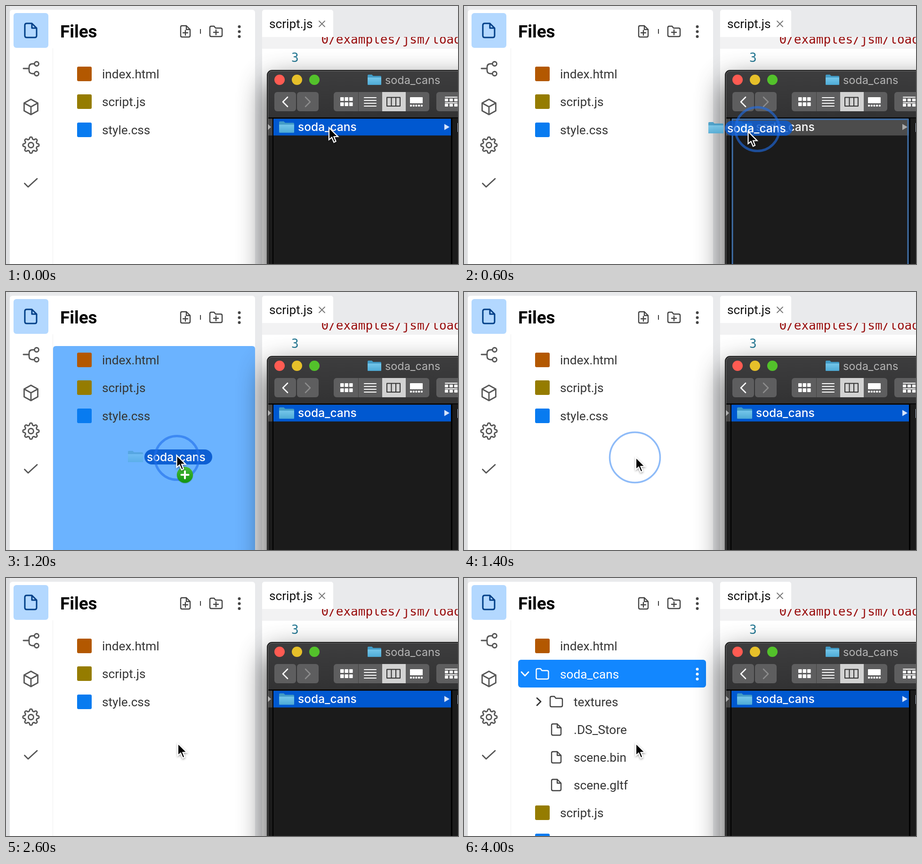
An HTML page that plays this animation: 960 px wide and 549 px high, repeating every 4200 ms.

```html
<!DOCTYPE html>
<html lang="en">
<head>
<meta charset="utf-8">
<title>Drag a folder into the file list</title>
<style>
html, body { margin: 0; width: 100%; height: 100%; overflow: hidden; background: #e9eaec; }
svg { display: block; width: 960px; height: 549px; }
text { font: 26.2px Roboto, sans-serif; fill: #363636; white-space: pre; }
.finder text { font: 500 24.5px Inter, sans-serif; fill: #fff; }
.line { fill: none; stroke: #555; stroke-width: 2.8; stroke-linecap: round; stroke-linejoin: round; }
</style>
</head>
<body>
<svg id="stage" viewBox="0 0 960 549"></svg>
<script>
const STEP = 200, LOOP = 4200;
const MONO = "font-family:'DejaVu Sans Mono',monospace;font-size:26px;";
const rect = (x, y, w, h, fill, r = 0, more = '') =>
  `<rect x="${x}" y="${y}" width="${w}" height="${h}" rx="${r}" fill="${fill}" ${more}/>`;
const dot = (x, y, r, fill) => `<circle cx="${x}" cy="${y}" r="${r}" fill="${fill}"/>`;
const text = (x, y, s, style = '') => `<text x="${x}" y="${y}" style="${style}">${s}</text>`;
const line = (d, color = '#555', w = 2.8) =>
  `<path class="line" d="${d}" style="stroke:${color};stroke-width:${w}"/>`;
const group = (id, body, more = '') => `<g id="${id}" ${more}>${body}</g>`;
const at = (x, y, body) => `<g transform="translate(${x} ${y})">${body}</g>`;
const dots = (x, y, fill) => [-10.5, 0, 10.5].map(d => dot(x, y + d, 3, fill)).join('');

// Outline icons centred on (x, y)
const page = (x, y, color = '#444') => at(x, y,
  line('M2-12H-7Q-10-12-10-9V9Q-10 12-7 12H7Q10 12 10 9V-4ZM2-12V-4H10', color, 2.4));
const folder = (x, y, color = '#444') => at(x, y,
  line('M-13-8Q-13-11-10-11H-4L-1-7H10Q13-7 13-4V8Q13 11 10 11H-10Q-13 11-13 8Z', color, 2.4));
const blueFolder = (x, y, w = 32) => at(x, y,
  `<g transform="scale(${w / 32})">` +
  `<path d="M0 2Q0 0 2 0H10L13 3H30Q32 3 32 5V24H0Z" fill="#429bc6"/>` +
  `<path d="M0 7H32V22Q32 24 30 24H2Q0 24 0 22Z" fill="url(#sky)"/></g>`);

const fileRow = (y, name, color) =>
  rect(151, y - 16, 31, 31, color, 3) + text(204, y + 9, name);

function gear(x, y) {
  let d = '';
  for (let i = 0; i < 96; i++) {
    const a = i / 96 * Math.PI * 2;
    const r = 15 + 2.2 * Math.tanh(2 * Math.cos(8 * a));
    d += (i ? 'L' : 'M') + (x + r * Math.sin(a)).toFixed(1) + ' ' + (y - r * Math.cos(a)).toFixed(1);
  }
  return line(d + 'Z') + `<circle class="line" cx="${x}" cy="${y}" r="5.5"/>`;
}

const sidebar =
  rect(0, 0, 8, 549, '#dedfe1') +
  rect(8, 8, 521, 560, '#fff', 6) +
  rect(99, 90, 1, 460, '#efefef') +
  rect(16, 15, 74, 74, '#b3d8ff', 6) +
  line('M55 37H44Q40 37 40 41V63Q40 67 44 67H61Q65 67 65 63V47ZM55 37V47H65', '#003f87', 3) +
  line('M37 133H49M60 123H57Q49 123 49 130V137Q49 144 57 144H60') +
  '<circle class="line" cx="65" cy="123" r="4.5"/><circle class="line" cx="65" cy="144" r="4.5"/>' +
  line('M53 198.500L67.500 206.500V223L53 231L38.500 223V206.500ZM38.500 206.500L53 214.500L67.500 206.500M53 214.500V231') +
  gear(53, 296) +
  line('M39.500 377.500L47 385L66 367.500');

const header =
  text(115, 67, 'Files', 'font-size:36.8px;font-weight:700;fill:#000') +
  page(381, 54) + line('M376 57H386M381 52V62', '#444', 2.4) +
  rect(412, 49, 2, 10, '#444') +
  folder(446, 54) + line('M441 56H451M446 51V61', '#444', 2.4) +
  dots(495.5, 54.5, '#444');

const html = fileRow(145, 'index.html', '#b35800');
const before = fileRow(204, 'script.js', '#957c00') + fileRow(264, 'style.css', '#087bf0');
const after =
  rect(115, 174, 399, 59, '#1287ff', 6) +
  line('M122 200L129.500 208L137 200', '#fff') + folder(166.500, 204, '#fff') +
  text(204, 213.500, 'soda_cans', 'fill:#fff') + dots(495.5, 204.5, '#fff') +
  line('M155 255.500L163 263L155 271', '#333') + folder(196, 263) + text(233, 273, 'textures') +
  ['.DS_Store', 'scene.bin', 'scene.gltf'].map((s, i) =>
    page(196, 322.5 + 59 * i) + text(233, 332 + 59.2 * i, s)).join('') +
  fileRow(500, 'script.js', '#957c00') + fileRow(560, 'style.css', '#087bf0');

const editor =
  rect(544, 66, 416, 483, '#fff') + rect(544, 66, 416, 25, '#f2f2f3') +
  `<g clip-path="url(#code)">${text(669.5, 80, '0/examples/jsm/load', MONO + 'fill:#980b0b')}</g>` +
  text(606, 119, '3', MONO + 'fill:#237893');
const tab =
  rect(544, 8, 151, 58, '#fff', 5) + rect(544, 50, 151, 16, '#fff') +
  text(559, 47, 'script.js', 'fill:#111') + line('M665 32L677 44M677 32L665 44', '#777', 1.8);

function cells(x, y, cols, rows, w, h, dx, dy, fill = '#fff') {
  let s = '';
  for (let i = 0; i < cols * rows; i++)
    s += rect(x + i % cols * dx, y + Math.floor(i / cols) * dy, w, h, fill, 1);
  return s;
}
const toolbar =
  dot(581, 157, 11, '#ff5b52') + dot(618, 157, 11, '#e6c02a') + dot(655, 157, 11, '#53c22b') +
  blueFolder(768, 146, 29) + text(805, 166, 'soda_cans', 'font-size:23.4px;font-weight:400;fill:#b5b5b5') +
  rect(570, 183, 46, 41, '#5e5e5f', 6) + rect(618, 183, 46, 41, '#5e5e5f', 6) +
  line('M598 194L588 204L598 214', '#fff', 2.6) + line('M636 194L646 204L636 214', '#8c8c8c', 2.6) +
  rect(696, 183, 203, 41, '#5e5e5f', 6) + rect(748, 183, 1, 41, '#444') +
  rect(799, 183, 50, 41, '#d2d2d2') +
  cells(710, 194, 3, 2, 7.5, 8, 9.5, 11) + cells(760, 194, 1, 4, 27, 2, 0, 6) +
  line('M809 194.500H837V213H809ZM818.500 194.500V213M828 194.500V213', '#333', 2) +
  rect(858, 194, 27, 13, '#fff', 1) + cells(858, 210, 5, 1, 4, 4, 5.7, 0) +
  rect(914, 183, 90, 41, '#5e5e5f', 6) +
  cells(932, 193, 1, 2, 27, 2, 0, 12) + cells(932, 197, 3, 2, 7, 6, 10, 11);

const finder =
  rect(555, 137, 900, 900, '#353536', 10, 'stroke="#1c1c1c" stroke-width="2"') +
  rect(556.5, 138.5, 900, 900, 'url(#steel)', 9, 'stroke="#6a6a6a" stroke-width="1"') + toolbar +
  rect(557, 238, 410, 320, '#1b1b1b') + rect(557, 237, 410, 2, '#050505') +
  rect(557, 240, 10, 35.5, '#464646') + '<path d="M556 251L563 257.500L556 264Z" fill="#aaa"/>' +
  rect(566, 238, 2, 311, '#000') + rect(945, 238, 3, 311, '#000') +
  rect(959, 249, 1, 19, '#aab7c8') +
  `<rect id="row" x="568" y="240" width="377" height="35.5"/>` +
  blueFolder(580, 245.5) + text(620, 266, 'soda_cans') +
  '<path id="arrow" d="M931 251L942 257.500L931 264Z"/>' +
  group('frame', line('M570 560V241H943V560', '#3f6fa8', 3));

const ghost =
  `<g id="ghostIcon">${blueFolder(-40, -13)}</g>` +
  rect(-5, -16, 144, 32, '#0b5cd2', 16, 'id="pill"') + text(0, 9, 'soda_cans');

const badge = dot(17.5, 42.5, 17.5, '#16701a55') + dot(17.5, 41.5, 17, 'url(#green)') +
  line('M10 41.500H25M17.500 34V49', '#fff', 4);
const pointer = '<path d="M0 0V25.500L6 20.500L10.500 31L14.500 29L10.500 19H19Z" fill="#000" ' +
  'stroke="#fff" stroke-width="2.2" filter="url(#soft)"/>';

const fade = (id, top, bottom) =>
  `<linearGradient id="${id}" x2="0" y2="1"><stop stop-color="${top}"/><stop offset="1" stop-color="${bottom}"/></linearGradient>`;

stage.innerHTML =
  `<defs>${fade('sky', '#74c6ea', '#4eabd6')}${fade('green', '#49bd3a', '#129410')}
  <linearGradient id="steel" gradientUnits="userSpaceOnUse" x1="0" y1="138" x2="0" y2="238">
    <stop stop-color="#3d3d3e"/><stop offset="1" stop-color="#323233"/></linearGradient>
  <clipPath id="code"><rect x="544" y="66" width="416" height="40"/></clipPath>
  <filter id="blur" x="-30%" y="-30%" width="160%" height="160%"><feGaussianBlur stdDeviation="31"/></filter>
  <filter id="soft" x="-50%" y="-50%" width="200%" height="200%">
    <feDropShadow dx="0" dy="2" stdDeviation="2" flood-opacity=".4"/></filter></defs>` +
  sidebar + header +
  group('drop', '<path d="M100 549V121Q100 115 106 115H523Q529 115 529 121V549Z" fill="#6bb3ff"/>') +
  html + group('before', before) + group('after', after) +
  editor + rect(555, 162, 700, 900, '#000', 10, 'opacity=".75" filter="url(#blur)"') + tab +
  group('finder', finder, 'class="finder"') +
  group('ghost', ghost, 'class="finder"') +
  '<circle id="ring" fill="none"/>' +
  group('cursor', group('badge', badge) + pointer);

const $ = id => document.getElementById(id);
const show = (id, on) => $(id).setAttribute('visibility', on ? 'visible' : 'hidden');
const set = (id, attrs) => { for (const k in attrs) $(id).setAttribute(k, attrs[k]); };
const place = (id, [x, y]) => set(id, { transform: `translate(${x} ${y})` });

// Pointer tip and the trailing press ring, one pose per step
const tips = [[686, 259], [684, 257], [676, 260], [603.5, 267.5], [422.5, 313.5], [364, 348], [362.5, 347.5], [365, 352]];
const rings = { 2: [681, 259], 3: [623, 262], 4: [435, 313], 5: [368, 349], 6: [363, 353], 7: [363, 352] };

function draw(now) {
  const n = Math.floor(now % LOOP / STEP);
  const over = n >= 4 && n <= 6, dragging = n >= 3 && n <= 6, leaving = n === 3, done = n >= 14;
  place('cursor', tips[Math.min(n, 7)]);
  show('badge', over);
  show('drop', over);
  show('before', !done);
  show('after', done);
  show('frame', leaving);
  set('row', { fill: leaving ? '#4c4c4c' : '#0058d0' });
  set('arrow', { fill: leaving ? '#aaa' : '#d5e4fb' });

  const ring = rings[n];
  show('ring', ring);
  if (ring) {
    const released = n === 7;
    set('ring', {
      cx: ring[0], cy: ring[1], r: released ? 53.5 : 46.5,
      stroke: released ? '#8ebbf8' : 'rgba(30,110,235,.6)', 'stroke-width': released ? 3.5 : 5
    });
  }
  show('ghost', dragging);
  if (dragging) {
    place('ghost', [ring[0] - 64, ring[1] - 2]);
    set('pill', { opacity: n < 5 ? 0.82 : 0.97 });
    set('ghostIcon', { opacity: leaving ? 0.9 : 0.5 });
  }
}
function tick() {
  draw(performance.now());
  requestAnimationFrame(tick);
}
tick();
</script>
</body>
</html>
```
